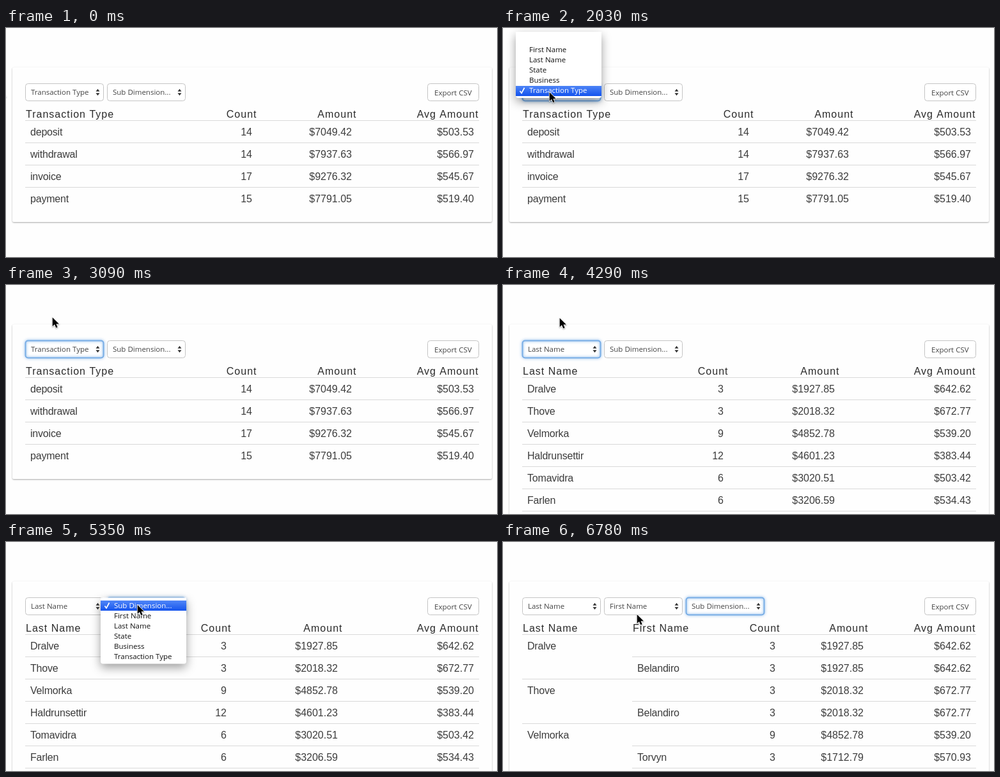
Write an HTML page with a canvas that moves like this. It is 768 px wide and 360 px high and loops after 8000 ms.

```html
<!DOCTYPE html>
<html lang="en">
<head>
<meta charset="utf-8">
<title>Transaction report</title>
<style>
  html, body { margin: 0; width: 100%; height: 100%; overflow: hidden; background: #fefefe; }
  canvas { display: block; width: 768px; height: 360px; }
</style>
</head>
<body>
<canvas id="stage" width="768" height="360"></canvas>
<script>
const ctx = document.getElementById('stage').getContext('2d');
const LOOP = 8000;
const BODY = '16px "Liberation Sans", Arial, sans-serif';
const UI = '11.5px "Open Sans", "Noto Sans", sans-serif';
const FIELDS = ['First Name', 'Last Name', 'State', 'Business', 'Transaction Type'];
const HINT = 'Sub Dimension...';

// Rows: [label, sub label, count, amount, average]
const VIEWS = [
  {
    heads: ['Transaction Type', ''], right: [385, 541, 732], bottom: 305,
    rows: [
      ['deposit', '', '14', '$7049.42', '$503.53'],
      ['withdrawal', '', '14', '$7937.63', '$566.97'],
      ['invoice', '', '17', '$9276.32', '$545.67'],
      ['payment', '', '15', '$7791.05', '$519.40']
    ]
  },
  {
    heads: ['Last Name', ''], right: [345, 519, 732], bottom: 400,
    rows: [
      ['Dralve', '', '3', '$1927.85', '$642.62'],
      ['Thove', '', '3', '$2018.32', '$672.77'],
      ['Velmorka', '', '9', '$4852.78', '$539.20'],
      ['Haldrunsettir', '', '12', '$4601.23', '$383.44'],
      ['Tomavidra', '', '6', '$3020.51', '$503.42'],
      ['Farlen', '', '6', '$3206.59', '$534.43'],
      ['', '', '', '', '']
    ]
  },
  {
    heads: ['Last Name', 'First Name'], right: [426, 564, 732], bottom: 400,
    rows: [
      ['Dralve', '', '3', '$1927.85', '$642.62'],
      ['', 'Belandiro', '3', '$1927.85', '$642.62'],
      ['Thove', '', '3', '$2018.32', '$672.77'],
      ['', 'Belandiro', '3', '$2018.32', '$672.77'],
      ['Velmorka', '', '9', '$4852.78', '$539.20'],
      ['', 'Torvyn', '3', '$1712.79', '$570.93'],
      ['', ' ', '', '', '']
    ]
  }
];

// Pointer moves: start, end, number of steps, from, to
const MOVES = [
  [360, 950, 6, [-20, 97], [72, 102]],
  [2030, 2370, 4, [72, 102], [72, 50]],
  [4290, 4870, 6, [72, 50], [205, 98]],
  [5940, 6180, 3, [205, 98], [209, 113]]
];

// The top is that of the first item; blink, fade and close follow the click
const MENUS = [
  { open: 1430, blink: 2850, fade: 2970, close: 3090, x: 20, top: 10, checked: 5, items: ['', ...FIELDS] },
  { open: 5350, blink: 6420, fade: 6540, close: 6660, x: 148, top: 91.5, checked: 0, items: [HINT, ...FIELDS] }
];

function text(str, x, y, font, color, align = 'left', spacing = 0) {
  ctx.font = font;
  ctx.fillStyle = color;
  ctx.textAlign = align;
  ctx.letterSpacing = spacing + 'px';
  ctx.fillText(str, x, y);
}

function box(x, y, w, h, r) {
  ctx.beginPath();
  ctx.roundRect(x, y, w, h, r);
}

function shadow(color, blur, dy) {
  ctx.shadowColor = color;
  ctx.shadowBlur = blur;
  ctx.shadowOffsetY = dy;
}

function drawCard(bottom) {
  ctx.save();
  ctx.fillStyle = '#fefefe';
  for (const [alpha, blur] of [[0.12, 3], [0.24, 2]]) {
    shadow(`rgba(0,0,0,${alpha})`, blur, 1);
    box(10, 62, 750, bottom - 62, 2);
    ctx.fill();
  }
  ctx.restore();
}

function drawButton(x, w) {
  box(x + 0.5, 87.5, w - 1, 27, 4);
  ctx.fillStyle = '#fff';
  ctx.fill();
  ctx.lineWidth = 1;
  ctx.strokeStyle = '#c4c4c4';
  ctx.stroke();
}

function drawSelect(x, label, focused) {
  drawButton(x, 123);
  if (focused) {
    ctx.save();
    shadow('rgba(80,150,225,.8)', 4, 0);
    ctx.lineWidth = 2;
    ctx.strokeStyle = '#79aee6';
    box(x + 0.5, 87.5, 122, 27, 4);
    ctx.stroke();
    ctx.restore();
  }
  text(label, x + 9, 105, UI, '#444');
  ctx.fillStyle = '#333';
  for (const dir of [-1, 1]) {
    const y = 101 + dir * 1.2;
    ctx.beginPath();
    ctx.moveTo(x + 110.5, y);
    ctx.lineTo(x + 116.5, y);
    ctx.lineTo(x + 113.5, y + dir * 4);
    ctx.fill();
  }
}

function drawTable({ heads, right, rows }) {
  const head = (s, x, align) => text(s, x, 141, BODY, '#2b2b2b', align, 1);
  head(heads[0], 31);
  head(heads[1], 203);
  ['Count', 'Amount', 'Avg Amount'].forEach((s, i) => head(s, right[i] + 7.5, 'right'));
  rows.forEach(([label, sub, ...nums], i) => {
    const y = 145 + i * 35, left = sub ? 202 : 30;
    ctx.fillStyle = '#d9d9d9';
    ctx.fillRect(left, y, 740 - left, 1);
    text(label, 38, y + 24, BODY, '#3c3c3c', 'left', -0.2);
    text(sub, 210, y + 24, BODY, '#3c3c3c', 'left', -0.2);
    nums.forEach((n, c) => text(n, right[c], y + 24, BODY, '#3c3c3c', 'right'));
  });
}

function drawCheck(x, y, color) {
  ctx.strokeStyle = color;
  ctx.lineWidth = 1.7;
  ctx.beginPath();
  ctx.moveTo(x - 3.5, y + 0.5);
  ctx.lineTo(x - 1, y + 4);
  ctx.lineTo(x + 3.5, y - 4.5);
  ctx.stroke();
}

function drawMenu(m, t, pointerY) {
  if (t < m.open || t >= m.close) return;
  const height = m.items.length * 16;
  const active = t >= m.blink && t < m.fade ? -1 : Math.floor((pointerY - m.top) / 16);
  ctx.save();
  ctx.globalAlpha = t >= m.fade ? 0.45 : 1;
  ctx.save();
  shadow('rgba(0,0,0,.38)', 15, 6);
  ctx.fillStyle = '#fff';
  box(m.x, m.top - 4, 134, height + 8, [0, 0, 4, 4]);
  ctx.fill();
  ctx.restore();
  m.items.forEach((item, i) => {
    const y = m.top + i * 16, on = i === active;
    if (on) {
      const blue = ctx.createLinearGradient(0, y, 0, y + 16);
      blue.addColorStop(0, '#5288f7');
      blue.addColorStop(1, '#1756ee');
      ctx.fillStyle = blue;
      ctx.fillRect(m.x, Math.round(y + 0.5), 134, 16);
    }
    const color = on ? '#fff' : '#111';
    text(item, m.x + 21, y + 12, UI, color);
    if (i === m.checked) drawCheck(m.x + 10, y + 8.5, color);
  });
  ctx.restore();
}

function pointerAt(t) {
  if (t < 120) return [-11, 97];
  let pos = MOVES[0][3];
  for (const [start, end, steps, a, b] of MOVES) {
    if (t < start) break;
    const step = Math.floor((t - start) / (end - start) * (steps - 1) + 1e-6) + 1;
    const u = Math.min(1, step / steps);
    const e = (u + u * u * (3 - 2 * u)) / 2;
    pos = [a[0] + (b[0] - a[0]) * e, a[1] + (b[1] - a[1]) * e * e];
  }
  return pos.map(Math.round);
}

function drawPointer([x, y]) {
  ctx.save();
  ctx.translate(x, y);
  shadow('rgba(0,0,0,.35)', 2, 1);
  const arrow = new Path2D('M.7 1V15L4 12 6.3 17.2 8.7 16.2 6.5 11.2H11Z');
  ctx.lineJoin = 'round';
  ctx.lineWidth = 1.6;
  ctx.strokeStyle = '#fff';
  ctx.stroke(arrow);
  ctx.shadowColor = 'transparent';
  ctx.fillStyle = '#000';
  ctx.fill(arrow);
  ctx.restore();
}

function draw(t) {
  const v = t < 3210 ? 0 : t < 6780 ? 1 : 2;
  const focus = t < 1430 ? -1 : t < 5350 ? 0 : t < 6780 ? 1 : 2;
  const labels = [v ? 'Last Name' : 'Transaction Type', v === 2 ? 'First Name' : HINT];
  if (v === 2) labels.push(HINT);
  const pointer = pointerAt(t);

  ctx.fillStyle = '#fefefe';
  ctx.fillRect(0, 0, 768, 360);
  drawCard(VIEWS[v].bottom);
  labels.forEach((s, i) => drawSelect(30 + i * 128, s, i === focus));
  drawButton(659, 81);
  text('Export CSV', 670, 106, UI, '#444');
  drawTable(VIEWS[v]);
  MENUS.forEach(m => drawMenu(m, t, pointer[1]));
  drawPointer(pointer);
}

const begin = performance.now();
function tick() {
  draw((performance.now() - begin) % LOOP);
  requestAnimationFrame(tick);
}
tick();
</script>
</body>
</html>
```
